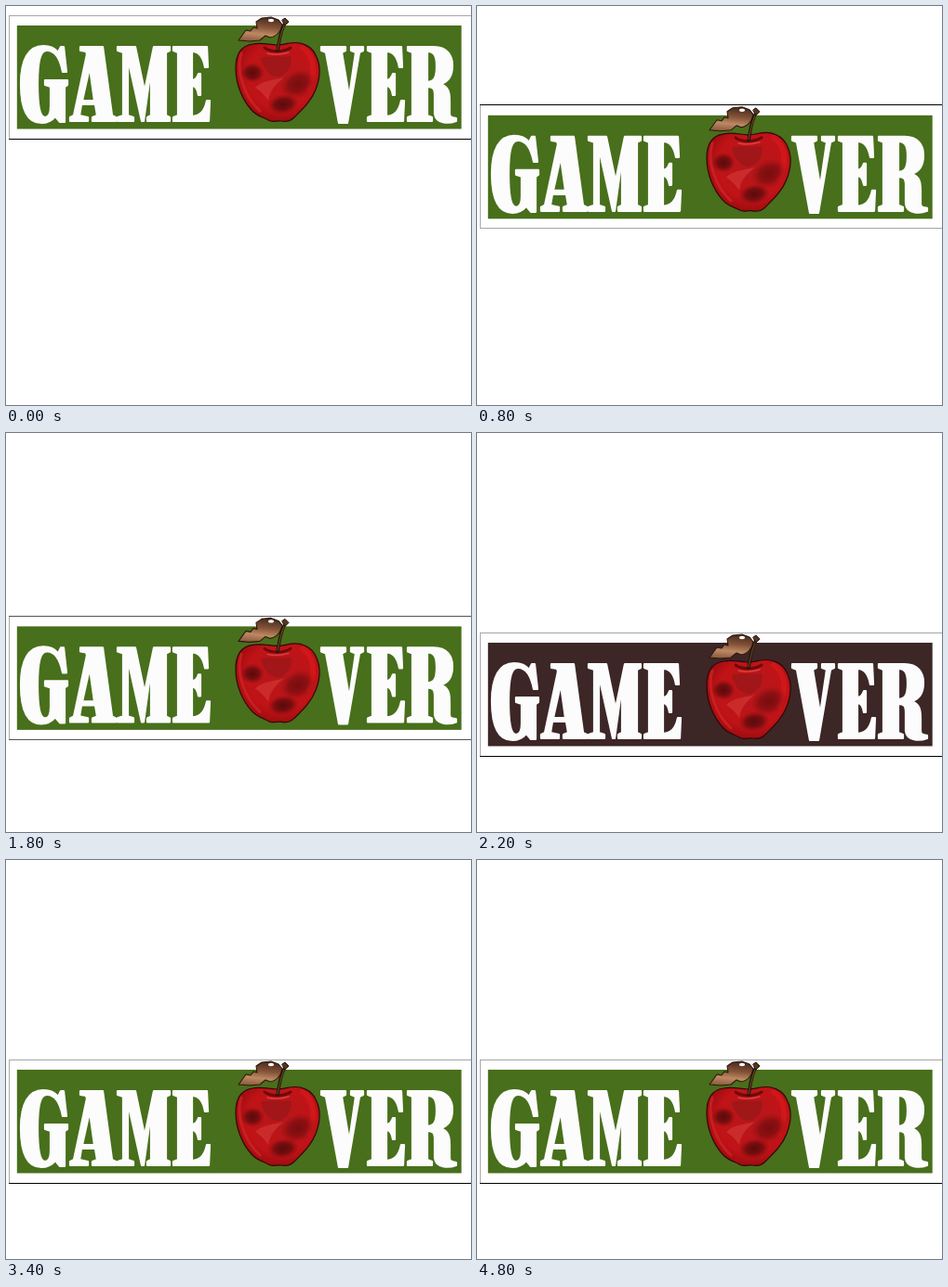
An HTML page that plays this animation: 500 px wide and 430 px high, repeating every 5000 ms.

```html
<!DOCTYPE html>
<html lang="en">
<head>
<meta charset="utf-8">
<title>Game over</title>
<style>
  html, body { margin: 0; width: 100%; height: 100%; overflow: hidden; background: #fff; }
  svg { display: block; }
</style>
</head>
<body>
<svg width="500" height="430" viewBox="0 0 500 430" role="img" aria-label="GAME OVER">
  <defs>
    <radialGradient id="skin" cx="55%" cy="42%" r="65%">
      <stop offset="0" stop-color="#b5171a"/>
      <stop offset=".65" stop-color="#c01317"/>
      <stop offset="1" stop-color="#8f0a0d"/>
    </radialGradient>
    <linearGradient id="leafTone" x1=".4" y1="1" x2=".6" y2="0">
      <stop offset="0" stop-color="#8d5b40"/>
      <stop offset=".3" stop-color="#bd8963"/>
      <stop offset=".6" stop-color="#845338"/>
      <stop offset="1" stop-color="#462a1c"/>
    </linearGradient>
    <radialGradient id="bruise">
      <stop offset="0" stop-color="#590a0b"/>
      <stop offset=".55" stop-color="#6d0c0e" stop-opacity=".85"/>
      <stop offset="1" stop-color="#8d0e10" stop-opacity="0"/>
    </radialGradient>
    <path id="E" d="M180 44H216L217 66H214C212 55 208 49 200 49V80C204 80 206 76 207 73H209V96H207C206 90 204 86 200 86V119C210 119 214 112 216 102H219L218 124H180V120L185 118V50L180 48Z"/>
    <path id="body" d="M291 42C283 42 276 39 265 41C252 43 247 53 247 67C247 84 254 101 264 112C270 119 277 120 282 123C287 126 291 123 296 124C301 125 306 124 310 120C318 112 328 103 333 90C338 77 338 64 334 55C329 42 316 38 305 40C300 41 296 42 291 42Z"/>
    <clipPath id="inside"><use href="#body"/></clipPath>
  </defs>

  <g id="frame" shape-rendering="crispEdges">
    <rect x="3" y="10" width="1" height="134" fill="#aaa"/>
    <rect id="topLine" x="3" y="10" width="497" height="1"/>
    <rect id="bottomLine" x="3" y="143" width="497" height="1"/>
  </g>

  <g id="banner">
    <rect id="panel" x="11.8" y="21" width="477.9" height="111.5"/>

    <g id="lettering" fill="#fcfcfc" stroke="#fcfcfc" stroke-width="2.2" stroke-linejoin="round" fill-rule="evenodd">
      <path d="M62 44L65 71H61C58 56 52 48 44 48C37 48 34 58 34 84C34 108 36 120 42 120C46 120 48 116 48 108V87L42 85V80H66V85L63 87V125H58L53 119C48 125 43 126 38 126C22 126 16 108 16 84C16 58 24 43 40 43C48 43 53 46 56 50L59 44Z"/>
      <path d="M80 44H104L114 118L118 120V124H93V120L98 118L96 106H81L79 118L88 120V124H69V120L73 118L87 52L86 49L80 48ZM90 66L95 102H82Z"/>
      <path d="M120 44H139L149 92L159 44H176V48L172 50V118L176 120V124H152V120L156 118V66L148 124H146L131 56V118L137 120V124H120V120L126 118V50L120 48Z"/>
      <use href="#E"/>
      <path d="M339 44H365V48L361 50L369 98L376 50L371 48V44H384V48L380 50L367 126H358L344 50L339 48Z"/>
      <use href="#E" x="209"/>
      <path d="M432 44H460C474 44 480 53 480 64C480 75 475 82 467 84C476 87 477 93 477 103V116C477 121 481 120 484 121V124C476 127 462 127 461 116V96C461 89 459 87 453 87V118L458 120V124H432V120L437 118V50L432 48ZM453 49V82C461 82 463 76 463 65C463 53 460 49 453 49Z"/>
    </g>

    <g id="apple" stroke-linejoin="round" stroke-linecap="round">
      <use href="#body" fill="url(#skin)"/>
      <g clip-path="url(#inside)">
        <path d="M253 51C247 70 256 98 273 113" fill="none" stroke="#d9292b" stroke-width="3" opacity=".6"/>
        <path d="M319 45C332 53 333 73 325 89" fill="none" stroke="#d8191c" stroke-width="6" opacity=".7"/>
        <path d="M274 56C282 53 299 56 306 54C309 63 303 73 294 76C284 77 277 68 274 56Z" fill="#a01619"/>
        <path d="M268 88C276 80 288 80 299 77C289 85 284 91 282 102C277 95 273 91 268 88Z" fill="#d43637" opacity=".65"/>
        <ellipse cx="314" cy="84" rx="20" ry="15" fill="url(#bruise)" opacity=".7" transform="rotate(-25 314 84)"/>
        <ellipse cx="265" cy="72" rx="13" ry="11" fill="url(#bruise)"/>
        <ellipse cx="298" cy="106" rx="17" ry="11" fill="url(#bruise)" transform="rotate(-8 298 106)"/>
        <path d="M278 45C284 50 299 50 306 45" fill="none" stroke="#6e090b" stroke-width="3"/>
        <path d="M281 51C288 53 297 52 304 50" fill="none" stroke="#d8403f" stroke-width="1.5"/>
      </g>
      <use href="#body" fill="none" stroke="#300708" stroke-width="1.2"/>
      <path d="M250 37L258 26L263 27L266 23L270 24L269 17L275 13L285 12L293 15L297 20C296 27 291 33 284 34L279 32L273 37L262 38Z" fill="url(#leafTone)" stroke="#2c170e" stroke-width="1.1"/>
      <ellipse cx="285" cy="15.5" rx="3" ry="1.7" fill="#fff"/>
      <path d="M292 48C294 38 294 30 300 18" fill="none" stroke="#241309" stroke-width="3.4"/>
      <path d="M292 47C294 38 295 29 300 19" fill="none" stroke="#5e4020" stroke-width="1.4"/>
      <path d="M297 15L300 13L304 17L300 21Z" fill="#543522" stroke="#241309"/>
    </g>
  </g>
</svg>
<script>
  const LOOP = 5000, STEP = 200;
  const GREEN = '#486f1b', BROWN = '#3d2626';
  // One banner position per step: it drops, overshoots, bounces and rests.
  const tops = [10, 29, 48, 78, 106, 139, 163, 196, 218, 197, 215];
  // Sub-pixel offset: 0 keeps the bottom rule crisp, 1 the top rule.
  const offsets = [0, .5, .5, .5, 1, .5, 0, .5, .5, .5, 0];
  const FLASH_START = 2200, FLASH_PERIOD = 700, FLASH_ON = 500;

  const part = id => document.getElementById(id);
  const frame = part('frame'), banner = part('banner'), panel = part('panel');
  const topLine = part('topLine'), bottomLine = part('bottomLine');
  const grey = paleness => {
    const level = Math.round(165 * paleness);
    return `rgb(${level},${level},${level})`;
  };
  const moveDown = (element, y) => element.setAttribute('transform', `translate(0 ${y})`);

  function draw(now) {
    const time = now % LOOP;
    const step = Math.min(Math.floor(time / STEP), tops.length - 1);
    const flashing = time >= FLASH_START && (time - FLASH_START) % FLASH_PERIOD < FLASH_ON;
    const drop = tops[step] - tops[0], offset = offsets[step];
    moveDown(frame, drop);
    moveDown(banner, drop + offset * .8);
    panel.setAttribute('fill', flashing ? BROWN : GREEN);
    topLine.setAttribute('fill', grey(1 - offset));
    bottomLine.setAttribute('fill', grey(offset));
  }

  const start = performance.now();
  function tick() {
    draw(performance.now() - start);
    requestAnimationFrame(tick);
  }
  tick();
</script>
</body>
</html>
```
